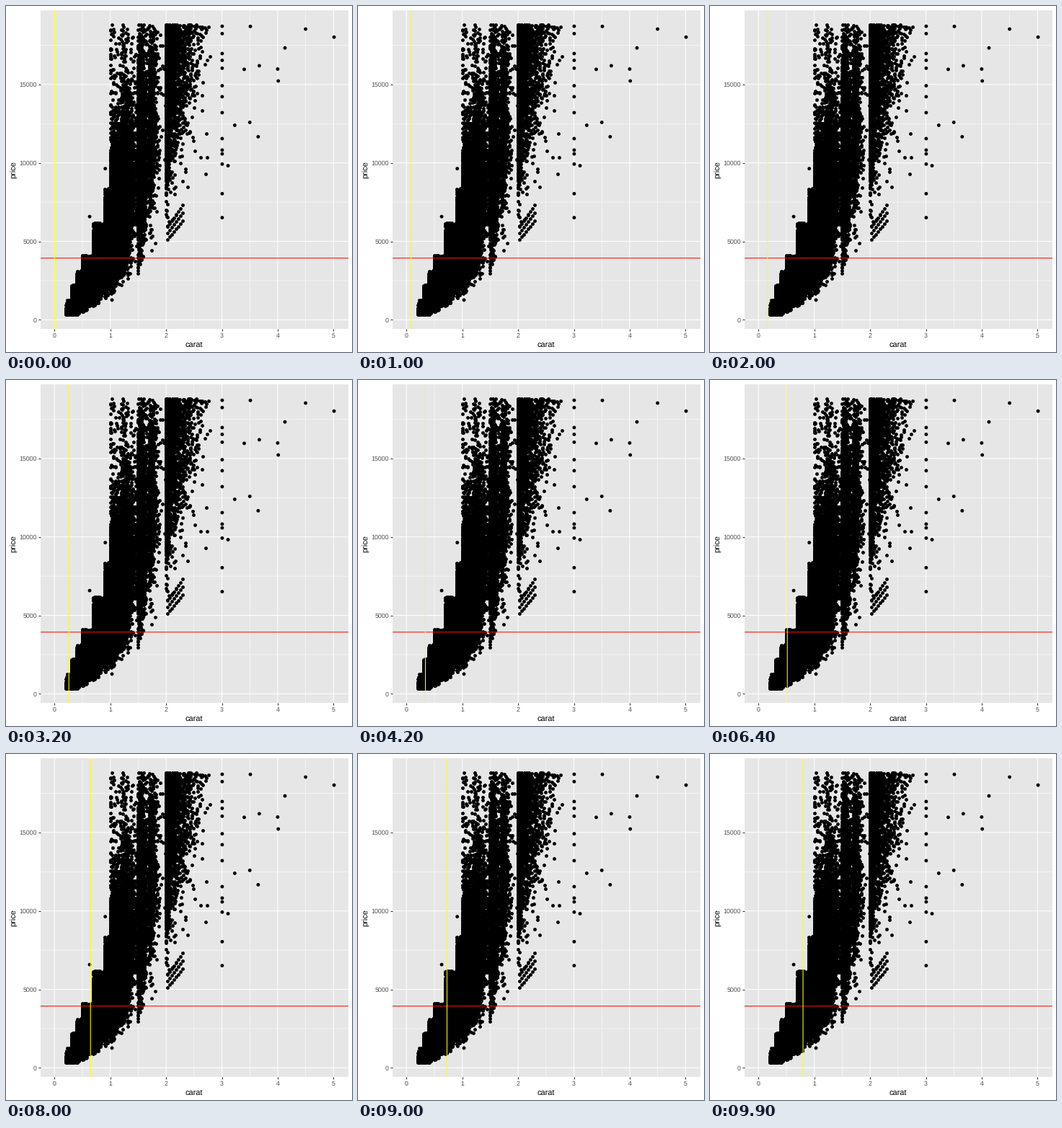
A matplotlib script for the animation above (10000 ms loop, 480x480 px).

```python
import numpy as np
import matplotlib.pyplot as plt
from matplotlib.animation import FuncAnimation

SIZE, DPI = 480, 96
PX = 72 / DPI                                # points per pixel
LEFT, RIGHT, TOP, BOTTOM = 47.9, 474.5, 5.5, 448.4
X_LIM, Y_LIM = (-0.2505, 5.2605), (-599, 19748)
MEAN_CARAT, MEAN_PRICE = 0.7979, 3932.8
MIN_PRICE, MAX_PRICE = 335, 18820
GROWTH = 1.65                                # price ~ carat ** GROWTH
FRAMES, INTERVAL = 100, 100
THICK, THIN = 1.07 * PX, 0.53 * PX
DOT = 4.87 * PX

# Popular sizes: (carat, stones, spread above that size)
SIZES = [
    (0.2, 500, 0.05), (0.3, 11000, 0.04), (0.4, 5000, 0.04),
    (0.5, 7000, 0.05), (0.7, 7500, 0.05), (0.9, 2700, 0.03),
    (1.0, 9000, 0.1), (1.2, 3500, 0.07), (1.5, 3500, 0.05),
    (1.7, 700, 0.05), (2.0, 800, 0.01), (2.0, 3200, 0.3),
]
LARGE = [
    (5.01, 18018), (4.5, 18531), (4.13, 17329), (4.01, 15223), (4, 15984),
    (3.67, 16193), (3.65, 11668), (3.51, 18701), (3.5, 12587), (3.4, 15964),
    (3.23, 12400), (3.11, 9823),
]
THREE_CARAT = [6512, 8040, 9925, 10577, 10820, 11548, 13203, 14220, 14918,
               16037, 16538, 16970, 18242, 18710]

plt.rcParams["font.family"] = "Liberation Sans"
plt.rcParams["text.hinting"] = "none"
rng = np.random.default_rng(12)


def size_group(size, n, spread):
    """Log-normal prices for stones at or just above a popular size."""
    carat = size + np.floor(rng.exponential(spread, n) * 100) / 100
    floor = np.maximum(MIN_PRICE, 1600 * carat ** 1.7)
    ceiling = MAX_PRICE if size >= 1 else 9500 * size ** 1.2
    sigma = 0.38 - 0.06 * carat
    price = 5000 * carat ** GROWTH * np.exp(sigma * rng.standard_normal(n))
    stray = rng.random(n) < 0.02
    price = np.where(stray, floor + (ceiling - floor) * rng.random(n), price)
    keep = (price >= floor) & (price <= ceiling) & (carat < 2.8)
    return np.column_stack([carat, price])[keep]


def price_row(base):
    """A rising row of cheap stones just above two carats."""
    carat = np.linspace(2.03, 2.3, 8)
    return np.column_stack([carat, base * (carat / 2) ** GROWTH])


def drop_overlaps(stones):
    """Keep one stone per pixel so redraws stay quick."""
    pixels = ax.transData.transform(stones).round()
    _, first = np.unique(pixels, axis=0, return_index=True)
    return stones[first]


def label(x, y, text, size, color, **kw):
    fig.text(x / SIZE, 1 - y / SIZE, text, fontsize=size * PX, color=color,
             va="baseline", **kw)


def to_px(carat=0, price=0):
    x, y = ax.transData.transform((carat, price))
    return x, SIZE - y


fig = plt.figure(figsize=(SIZE / DPI, SIZE / DPI), dpi=DPI, facecolor="white")
ax = fig.add_axes([LEFT / SIZE, 1 - BOTTOM / SIZE,
                   (RIGHT - LEFT) / SIZE, (BOTTOM - TOP) / SIZE],
                  facecolor="#e6e6e6", xlim=X_LIM, ylim=Y_LIM)
ax.spines[:].set_visible(False)

x_ticks, y_ticks = range(6), range(0, 15001, 5000)
ax.set_xticks(x_ticks)
ax.set_yticks(y_ticks)
ax.tick_params(length=2.75 * PX, width=THICK, color="#333333",
               labelbottom=False, labelleft=False)

for x in np.arange(0, 5.1, 0.5):
    ax.axvline(x, color="white", lw=THIN if x % 1 else THICK,
               snap=False, zorder=1)
for y in range(0, 17501, 2500):
    ax.axhline(y, color="white", lw=THIN if y % 5000 else THICK,
               snap=False, zorder=1)

for t in x_ticks:
    label(to_px(carat=t)[0], 460, str(t), 8.8, "#4d4d4d", ha="center")
for t in y_ticks:
    label(43, to_px(price=t)[1] + 3.1, str(t), 8.8, "#4d4d4d", ha="right")
label((LEFT + RIGHT) / 2, 473, "carat", 11, "black", ha="center")
label(13.6, (TOP + BOTTOM) / 2, "price", 11, "black", ha="center",
      rotation=90, rotation_mode="anchor")

cloud = np.vstack([size_group(*s) for s in SIZES]
                  + [price_row(b) for b in (5000, 5400, 5800)]
                  + [(1.5, p) for p in range(2950, 4300, 200)])
ax.plot(*drop_overlaps(cloud).T, "o", color="black", ms=DOT, mew=0, zorder=2)

# One size per dot keeps these lone stones at sub-pixel positions
lone = np.array(LARGE + [(3.005, p) for p in THREE_CARAT]
                + [(0.63, 6580), (0.91, 9636), (1.03, 1262)])
ax.scatter(*lone.T, s=np.full(len(lone), DOT ** 2), color="black",
           linewidths=0, zorder=2)

ax.axhline(MEAN_PRICE, color="#f6120a", lw=THICK, snap=False, zorder=3)
sweep = ax.axvline(0, color="#ffff0b", lw=THICK, snap=False, zorder=4)


def update(i):
    x = MEAN_CARAT * i / (FRAMES - 1)
    sweep.set_xdata([x, x])
    return [sweep]


anim = FuncAnimation(fig, update, frames=FRAMES, interval=INTERVAL,
                     repeat=True, repeat_delay=0)
plt.show()
```
